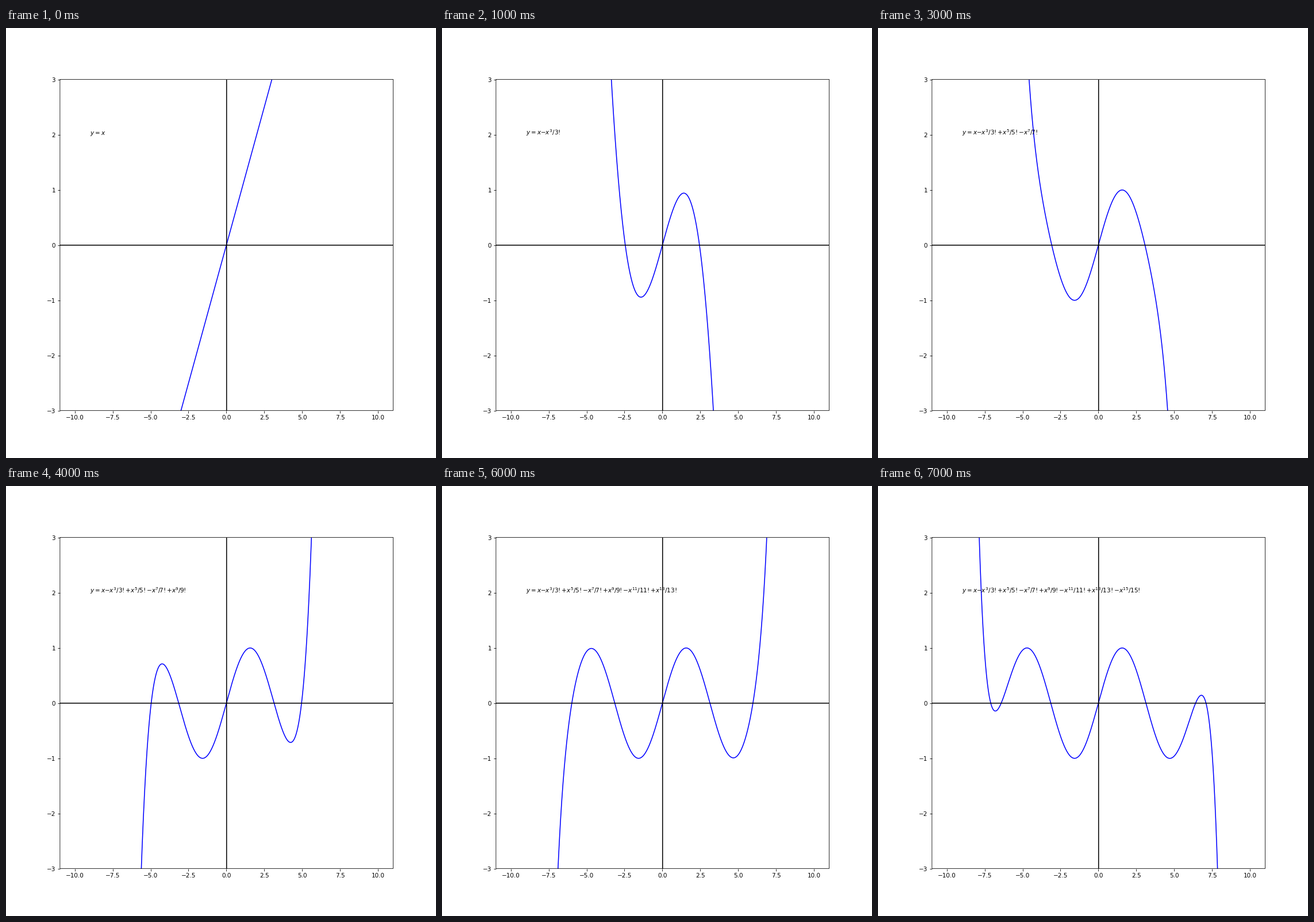
These frames come from a looping animation (748x748 px, 8000 ms). A matplotlib script:

```python
from math import factorial

import matplotlib.pyplot as plt
import numpy as np
from matplotlib.animation import FuncAnimation
from matplotlib.patches import Rectangle
from matplotlib.transforms import ScaledTranslation

INCHES, DPI = 10, 74.8
TERMS = 8

x = np.linspace(-10, 10, 1001)


def taylor(count):
    """Partial sum of the sine series with the given number of terms."""
    return sum((-1) ** k * x ** (2 * k + 1) / factorial(2 * k + 1)
               for k in range(count))


def formula(count):
    # Each term is its own math segment, so its sign is set without spacing.
    parts = ["$y=x$"]
    for k in range(1, count):
        n = 2 * k + 1
        sign = "-" if k % 2 else "+"
        parts.append(f"${sign}x^{{{n}}}/{n}!$")
    return "".join(parts)


fig, ax = plt.subplots(figsize=(INCHES, INCHES), dpi=DPI)
ax.set_xlim(-11, 11)
ax.set_ylim(-3, 3)
ax.set_xticks(np.arange(-10, 10.1, 2.5))
ax.set_yticks(range(-3, 4))

# The frame and the vertical axis sit a fraction of a pixel up and right.
nudge = ScaledTranslation(0.005, 0.005, fig.dpi_scale_trans)
ax.spines[:].set_visible(False)
ax.add_patch(Rectangle((0, 0), 1, 1, transform=ax.transAxes + nudge,
                       fill=False, lw=0.8, snap=False, clip_on=False,
                       zorder=2.5))

curve, = ax.plot([], [], color="blue")
ax.axhline(0, color="black", snap=False)
y_axis = ax.axvline(0, color="black", snap=False)
y_axis.set_transform(y_axis.get_transform() + nudge)
label = ax.text(-9, 2, "")


def update(frame):
    curve.set_data(x, taylor(frame + 1))
    label.set_text(formula(frame + 1))
    return curve, label


anim = FuncAnimation(fig, update, frames=TERMS, interval=1000,
                     repeat=True, repeat_delay=0)
plt.show()
```
